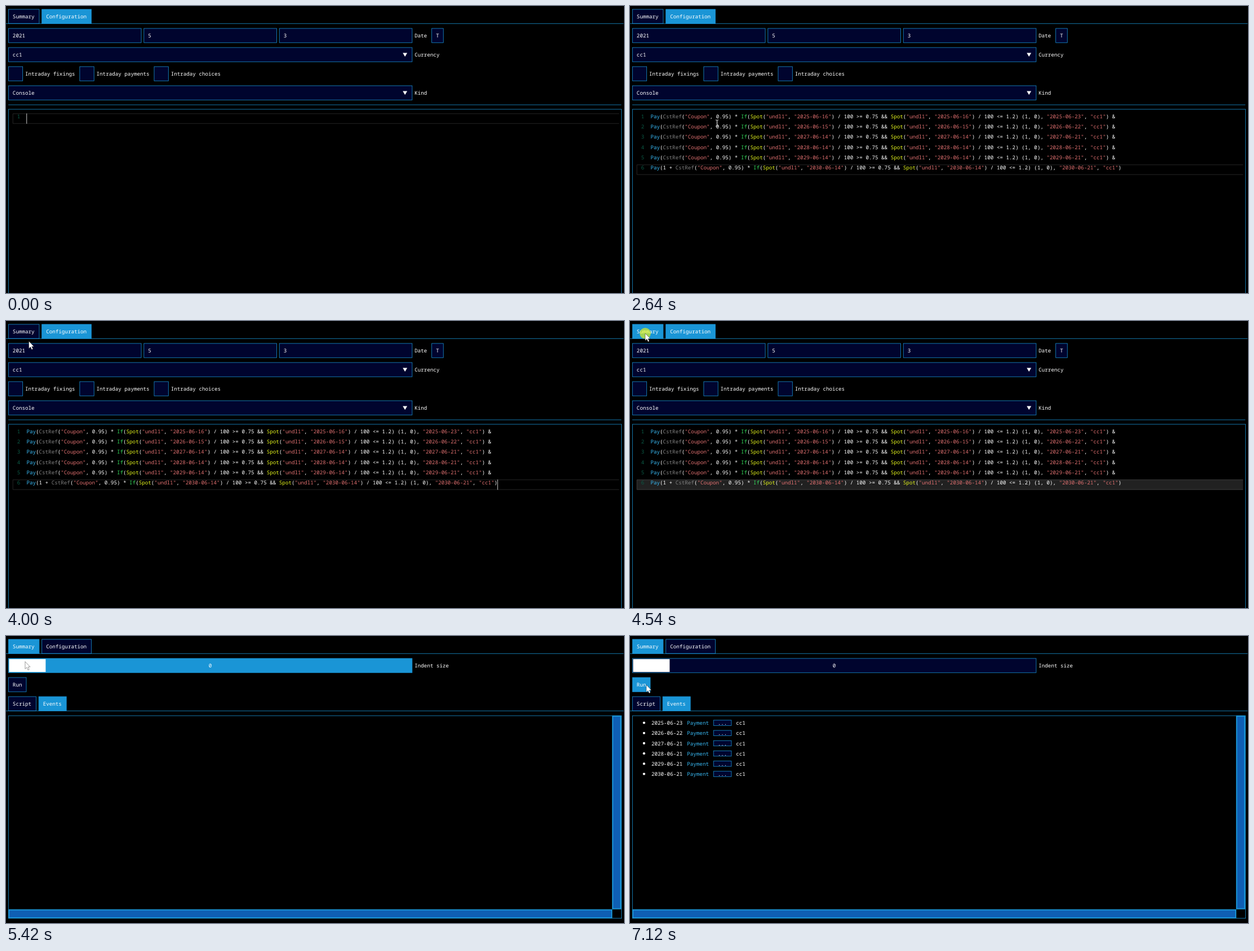
Write an HTML page that moves like this. It is 1097 px wide and 511 px high and loops after 8 s.

```html
<!DOCTYPE html>
<html lang="en">
<head>
<meta charset="utf-8">
<title>Payoff script editor</title>
<style>
  html, body { margin: 0; width: 100%; height: 100%; overflow: hidden; background: #000; }
  svg { display: block; width: 1097px; height: 511px; }
  text { font: 11.667px "Noto Sans Mono", "DejaVu Sans Mono", monospace; fill: #fff;
         text-rendering: geometricPrecision; white-space: pre; }
  .box { fill: #00042e; stroke: #1a95d6; }
  .box.on { fill: #1a95d6; }
  .panel { fill: none; stroke: #1a95d6; }
  .rule { fill: #1a95d6; }
  .bar { fill: #0f5fb4; stroke: #1a95d6; stroke-width: 2.5; }
  .white { fill: #fff; }
  .line { fill: none; stroke: #303030; }
  .line.idle { fill: #212121; stroke: #484848; }
  .num { fill: #0a5a46; }
  .Pay { fill: #38b8f2; }
  .CstRef { fill: #808080; }
  .If { fill: #35dc5c; }
  .Spot { fill: #e2f31c; }
  .str { fill: #e07070; }
</style>
</head>
<body>
<svg id="stage" viewBox="0 0 1097 511"></svg>
<script>
const LOOP = 8000, STEP = 70;
// The interface is laid out on a 1387 px wide grid and scaled down to the stage
const SCALE = 1097 / 1387, CHAR = 7, ROW = 23, HEIGHT = 33, PAD = 10;
const stage = document.getElementById('stage');

function add(parent, tag, attrs, content) {
  const node = document.createElementNS('http://www.w3.org/2000/svg', tag);
  for (const name in attrs) node.setAttribute(name, attrs[name]);
  if (content) node.textContent = content;
  return parent.appendChild(node);
}
const group = parent => add(parent, 'g', {});
const rect = (parent, cls, x, y, width, height) =>
  add(parent, 'rect', { class: cls, x, y, width, height });
const frame = (parent, cls, x, y, w, h) => rect(parent, cls, x + .5, y + .5, w - 1, h - 1);
// y is the top of the text row
const label = (parent, x, y, content, cls = '') =>
  add(parent, 'text', { x, y: y + 11, class: cls }, content);

function field(parent, x, y, w, content, on) {
  const node = frame(parent, on ? 'box on' : 'box', x, y, w, HEIGHT);
  label(parent, x + PAD, y + PAD, content);
  return node;
}
const button = (parent, x, y, content) =>
  field(parent, x, y, content.length * CHAR + 2 * PAD, content);
const tab = (parent, x, y, content, on) =>
  field(parent, x, y, content.length * CHAR + 2 * PAD + 1, content, on);
function combo(parent, y, value, name) {
  const node = field(parent, 5, y, 907, value);
  add(parent, 'path', { class: 'white', d: `M890.5 ${y + 12.5}h10l-5 8.5z` });
  label(parent, 917, y + PAD, name);
  return node;
}
function check(parent, x, name) {
  const node = frame(parent, 'box', x, 136, HEIGHT, HEIGHT);
  label(parent, x + HEIGHT + 5, 136 + PAD, name);
  return node;
}

const ui = add(stage, 'g', { transform: `scale(${SCALE})` });

// Tab strip
const summaryTab = tab(ui, 5, 7, 'Summary');
const configTab = tab(ui, 80, 7, 'Configuration');
rect(ui, 'rule', 0, 39, 1386, 1);

// Configuration page
const config = group(ui);
['2021', '5', '3'].forEach((part, i) => field(config, 5 + i * 304, 50, 299, part));
label(config, 917, 60, 'Date');
button(config, 955, 50, 'T');
const currency = combo(config, 93, 'cc1', 'Currency');
const fixings = check(config, 5, 'Intraday fixings');
check(config, 165, 'Intraday payments');
check(config, 332, 'Intraday choices');
const kind = combo(config, 179, 'Console', 'Kind');
rect(config, 'rule', 5, 222, 1376, 1);
frame(config, 'panel', 5, 232, 1377, 450);

// Editor
const TOP = 242, LEFT = 46;
const activeLine = row => add(config, 'path', {
  class: 'line', d: `M1376 ${TOP + row * ROW + .5}H15.5v${ROW - 1}H1376`
});
const caret = (row, col) => rect(config, 'white', LEFT + col * CHAR, TOP + row * ROW, 1, ROW);
const firstLine = activeLine(0), lastLine = activeLine(5);
const firstCaret = caret(0, 0), lastCaret = caret(5, 151);
label(config, 25, TOP, '1', 'num');
const code = group(config);

const schedule = [
  ['2025-06-16', '2025-06-23'], ['2026-06-15', '2026-06-22'], ['2027-06-14', '2027-06-21'],
  ['2028-06-14', '2028-06-21'], ['2029-06-14', '2029-06-21'], ['2030-06-14', '2030-06-21']
];
function codeLine(text, y) {
  let col = 0;
  for (const token of text.split(/("[^"]*"|Pay|CstRef|If|Spot|\s+)/)) {
    const cls = token[0] === '"' ? 'str' : /^[A-Z]/.test(token) ? token : '';
    if (token.trim()) label(code, LEFT + col * CHAR, y, token, cls);
    col += token.length;
  }
}
schedule.forEach(([fix, pay], i) => {
  const last = i === schedule.length - 1, y = TOP + i * ROW;
  const spot = `Spot("undl1", "${fix}") / 100`;
  if (i) label(code, 25, y, String(i + 1), 'num');
  codeLine(`Pay(${last ? '1 + ' : ''}CstRef("Coupon", 0.95) * If(${spot} >= 0.75 && ${spot} <= 1.2) ` +
    `(1, 0), "${pay}", "cc1")${last ? '' : ' &'}`, y);
});

// Summary page
const summary = group(ui);
const slider = frame(summary, 'box', 5, 50, 907, HEIGHT);
rect(summary, 'white', 7, 52, 82, 29);
label(summary, 455, 60, '0');
label(summary, 917, 60, 'Indent size');
const run = button(summary, 5, 93, 'Run');
tab(summary, 5, 136, 'Script');
tab(summary, 73, 136, 'Events', true);
rect(summary, 'rule', 0, 168, 1386, 1);
frame(summary, 'panel', 5, 179, 1377, 457);
rect(summary, 'bar', 1361.5, 180.5, 18, 433.5);
rect(summary, 'bar', 6.5, 616.5, 1353, 18);

const events = group(summary);
schedule.forEach(([, pay], i) => {
  const y = 189 + i * ROW;
  add(events, 'circle', { class: 'white', cx: 31.5, cy: y + 6.5, r: 2.7 });
  label(events, 48, y, pay);
  label(events, 128, y, 'Payment', 'Pay');
  frame(events, 'box', 187, y, 41, 13);
  label(events, 197, y, '...');
  label(events, 238, y, 'cc1');
});

// Pointer
const pointer = group(stage);
const click = add(pointer, 'circle', { r: 9.8, fill: '#ff0', opacity: .6 });
const arrow = add(pointer, 'path', {
  d: 'M0 0V13L3 10.3L5 15L7.2 14L5.2 9.5H9Z', fill: '#fff', stroke: '#000', 'stroke-width': .4
});
const beam = add(pointer, 'path', {
  d: 'M0 -5.5H1.6L2.5 -5L3.4 -5.5H5M2.5 -5V5M0 5.5H1.6L2.5 5L3.4 5.5H5', fill: 'none', stroke: '#fff'
});

// Each move: start, steps, from, to, deceleration in x and y
const moves = [
  { at: 460, n: 12, from: [1138, 553], to: [152, 208.5], pow: [1.7, 1.7] },
  { at: 3440, n: 12, from: [152, 208.5], to: [27, 22], pow: [1.6, 1.87] },
  { at: 5140, n: 12, from: [27, 22], to: [39, 73], pow: [1.6, 1.15] },
  { at: 5980, n: 9, from: [39, 73], to: [29, 87], pow: [1.5, 1.5] }
];
function position(t) {
  const move = moves.filter(m => t >= m.at).pop();
  if (!move) return [-99, -99];
  const u = Math.min(1, (Math.floor((t - move.at) / STEP) + 1) / move.n);
  return move.from.map((a, i) => a + (move.to[i] - a) * (1 - (1 - u) ** move.pow[i]));
}

const within = (t, ...spans) => spans.some(([a, b]) => t >= a && t < b);
const show = (node, on) => { node.style.display = on ? '' : 'none'; };
const light = (node, on) => node.classList.toggle('on', on);

function draw(t) {
  const isConfig = t < 4610, pasted = t >= 2640;
  const [x, y] = position(t);
  // Hover feedback trails the pointer by one step
  const [hx, hy] = position(t - STEP).map(v => v / SCALE);
  const over = (left, top, w) => hx >= left && hx < left + w && hy >= top && hy < top + HEIGHT;

  show(config, isConfig);
  show(summary, !isConfig);
  show(code, pasted);
  show(firstLine, !pasted);
  show(lastLine, pasted);
  lastLine.classList.toggle('idle', t >= 4540);
  show(firstCaret, within(t, [0, 130], [530, 930], [1430, 1830], [2230, 2640]));
  show(lastCaret, within(t, [3040, 3440], [3840, 4280]));
  show(events, t >= 7050);

  light(summaryTab, !isConfig || over(5, 7, 70));
  light(configTab, isConfig);
  light(currency, over(5, 93, 907));
  light(fixings, over(5, 136, 150));
  light(kind, over(5, 179, 907));
  light(slider, over(5, 50, 907));
  light(run, over(5, 93, 41));

  const inEditor = isConfig && y > 183;
  pointer.setAttribute('transform', `translate(${x} ${y})`);
  show(arrow, !inEditor);
  show(beam, inEditor);
  show(click, within(t, [1500, 1620], [4540, 4680], [6870, 7120]));
}

function tick() {
  draw(performance.now() % LOOP);
  requestAnimationFrame(tick);
}
tick();
</script>
</body>
</html>
```
